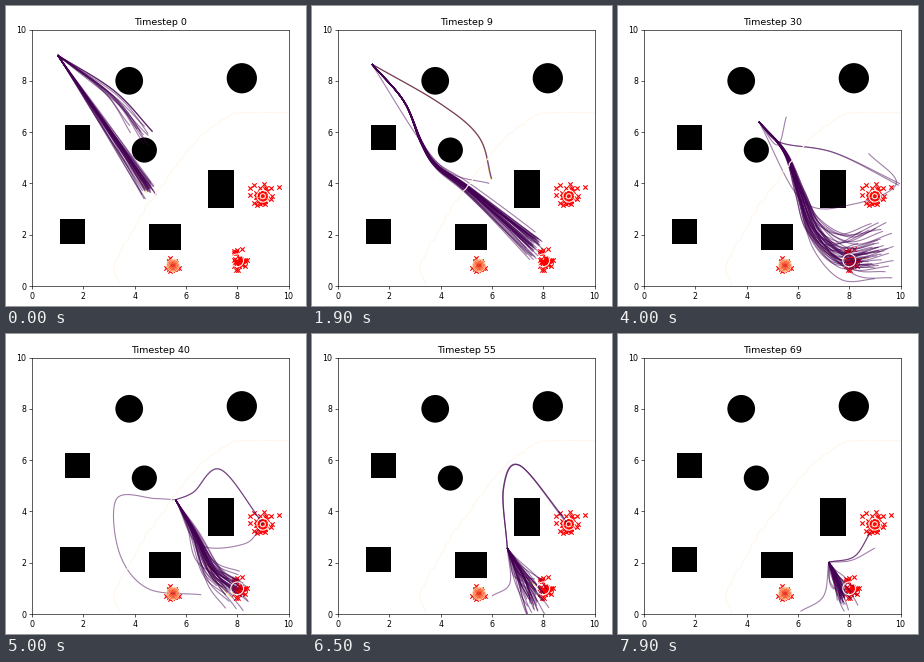
Recreate the animation shown at these times as a matplotlib script. Size 300 by 300 pixels, loop 8000 ms.

```python
import numpy as np
import matplotlib.pyplot as plt
from matplotlib.animation import FuncAnimation
from matplotlib.collections import LineCollection
from matplotlib.patches import Circle, Rectangle

SIZE, DPI = 300, 50
LEFT, RIGHT, TOP, BOTTOM = 26, 282.5, 23.5, 280
HOLD, FRAMES, INTERVAL = 10, 80, 100
SAMPLES = 60

PURPLE = (68 / 255, 1 / 255, 84 / 255, 0.5)
YELLOW = (253 / 255, 205 / 255, 37 / 255, 0.6)

NEAR, LOW, FAR = (5.5, 0.8), (8.0, 1.0), (9.0, 3.5)

rng = np.random.default_rng(12)

# Vehicle position and width of the path bundle at a few time steps
STEPS = [0, 9, 20, 30, 40, 55, 69]
HEAD = [(1, 9), (1.32, 8.65), (2.78, 7.72), (4.48, 6.4),
        (5.6, 4.45), (6.6, 2.57), (7.2, 2.02)]
SPREAD = [0.16, 0.22, 0.27, 0.45, 0.28, 0.30, 0.22]
POWER = [1.2, 2.5, 4, 1.8, 1.3, 1.1, 1.1]

# Points ahead of the vehicle, keyed by time step
MAIN = {
    0: [(4.55, 3.75)],
    9: [(2.57, 7.2), (3.25, 5.6), (3.85, 4.68), (5.1, 3.75), (7.65, 1.55)],
    20: [(3.2, 6.82), (3.37, 5.65), (3.9, 4.75), (5.1, 3.75), (7.2, 1.8), (8.5, 1.6)],
    30: [(5.5, 5.2), (6.1, 3.6), (6.7, 2.1), (7.8, 1.2), (9.1, 1.4)],
    40: [(6.3, 3.2), (7.0, 1.7), (7.9, 0.95)],
    55: [(7.65, 0.6)],
    69: [(7.8, 0.7)],
}
FAN = {**MAIN, 0: [(3.1, 7.4), (4.3, 5.9)]}
OVER = {
    0: [(3.2, 7.6), (4.7, 6.0)],
    9: [(4.0, 7.1), (5.5, 5.8), (6.0, 4.15)],
    20: [(4.8, 6.3), (5.6, 4.2), (6.05, 0.85)],
    30: [(5.3, 5.6), (7.4, 5.2), (9.9, 4.0)],
    40: [(6.3, 4.75), (7.35, 5.62), FAR],
    55: [(6.45, 4.9), (7.1, 5.8), FAR],
    69: [(8.2, 2.25), (8.8, 3.2)],
}
WIDE = {
    **OVER,
    20: [(4.9, 6.2), (5.9, 4.3), (6.3, 2.9)],
    30: [(6.2, 3.3), (8.2, 3.2), (9.85, 4.0), (8.75, 5.2)],
    40: [(6.5, 2.7), (8.3, 2.7), FAR],
    69: [(8.1, 2.1), (9.0, 2.6)],
}
BACK = {
    **MAIN,
    9: [(3.25, 5.6), (4.4, 4.4), (5.9, 4.0)],
    30: [(5.2, 5.5), (5.55, 6.6)],
    40: [(4.8, 4.5), (3.3, 4.5), (3.4, 2.4), (4.5, 1.0), (6.6, 0.75)],
    55: [(6.7, 1.2), (6.0, 0.7)],
    69: [(7.0, 0.7), (6.1, 0.1)],
}


def smooth(points):
    """Catmull-Rom curve through the points, evenly spaced along its length."""
    p = np.array(points, float)
    p = np.vstack([2 * p[0] - p[1], p, 2 * p[-1] - p[-2]])
    u = np.linspace(0, 1, 30)[:, None]
    curve = np.vstack([
        b + u * (c - a) / 2 + u**2 * (2 * a - 5 * b + 4 * c - d) / 2
        + u**3 * (3 * b - a - 3 * c + d) / 2
        for a, b, c, d in zip(p, p[1:], p[2:], p[3:])])
    length = np.append(0, np.cumsum(np.hypot(*np.diff(curve, axis=0).T)))
    at = np.linspace(0, length[-1], SAMPLES)
    return np.stack([np.interp(at, length, axis) for axis in curve.T], -1)


class Group:
    def __init__(self, route, count, looseness):
        self.curves = [smooth([h] + route[s]) for s, h in zip(STEPS, HEAD)]
        self.looseness = looseness
        self.z = np.clip(rng.normal(size=(4, count, 1, 2)), -2.2, 2.2)

    def paths(self, step):
        k = min(np.searchsorted(STEPS, step, side="right"), len(STEPS) - 1)
        mix = (step - STEPS[k - 1]) / (STEPS[k] - STEPS[k - 1])
        mean = (1 - mix) * self.curves[k - 1] + mix * self.curves[k]
        u = np.linspace(0, 1, SAMPLES)[:, None]
        width = np.interp(step, STEPS, SPREAD) * u**np.interp(step, STEPS, POWER)
        # Slow wander in time, with a turn along each path
        c, s = np.cos(0.15 * step), np.sin(0.15 * step)
        start = c * self.z[0] + s * self.z[1]
        end = c * self.z[2] + s * self.z[3]
        drift = np.cos(1.5 * u) * start + np.sin(1.5 * u) * end
        return mean + self.looseness * width * drift


groups = [Group(OVER, 2, 0.1), Group(MAIN, 36, 1), Group(FAN, 11, 1.3),
          Group(WIDE, 1, 0.1), Group(BACK, 1, 0)]

fig = plt.figure(figsize=(SIZE / DPI, SIZE / DPI), dpi=DPI, facecolor="white")
ax = fig.add_axes([LEFT / SIZE, 1 - BOTTOM / SIZE,
                   (RIGHT - LEFT) / SIZE, (BOTTOM - TOP) / SIZE])
ax.set(xlim=(0, 10), ylim=(0, 10),
       xticks=range(0, 11, 2), yticks=range(0, 11, 2))
ax.tick_params(labelsize=11.3, length=4, pad=4, width=0.9)
ax.spines[:].set_linewidth(0.9)
title = ax.set_title("Timestep 0", fontsize=13.6)

# Obstacles
for x, y, w, h in [(1.3, 5.3, 0.98, 0.98), (1.1, 1.62, 0.98, 0.98),
                   (4.55, 1.42, 1.26, 0.98), (6.88, 3.06, 0.98, 1.48)]:
    ax.add_patch(Rectangle((x, y), w, h, fc="black", lw=0, zorder=1))
for x, y, r in [(3.79, 8, 0.54), (8.18, 8.1, 0.59), (4.38, 5.3, 0.49)]:
    ax.add_patch(Circle((x, y), r, fc="black", lw=0, zorder=1))

# Goal samples
samples = np.vstack([rng.normal(goal, sigma, (count, 2)) for goal, sigma, count
                     in [(NEAR, 0.13, 30), (LOW, 0.21, 34), (FAR, 0.22, 38)]])
ax.scatter(*samples.T, s=40, marker="x", color="red", linewidths=1.6, zorder=2)

bundle = LineCollection([], linewidths=1.6, zorder=3)
ax.add_collection(bundle)

# Density contours
shade = plt.get_cmap("OrRd")
edge = smooth([(3.45, 0), (3.22, 0.75), (4, 2.3), (4.9, 3.7),
               (6.5, 5.75), (7.7, 6.6), (8.3, 6.76), (10, 6.76)])
edge[:-12] += rng.normal(0, 0.025, edge[:-12].shape)
ax.plot(*edge.T, color=shade(0.0), lw=1.6, zorder=4)

rings = [(LOW, 0.25, 0.0), (FAR, 0.23, 0.0), (FAR, 0.1, 0.1)]
rings += [(NEAR, 0.24 - 0.05 * k, 0.3 + 0.1 * k) for k in range(5)]
for center, r, level in rings:
    ax.add_patch(Circle(center, r, fill=False, ec=shade(level), lw=1.6, zorder=4))


def draw(i):
    step = max(0, i - HOLD)
    title.set_text(f"Timestep {step}")
    paths = np.concatenate([g.paths(step) for g in groups])
    colors = [PURPLE] * len(paths)
    colors[0 if 0 < step < 26 else 2] = YELLOW
    bundle.set_segments(paths)
    bundle.set_color(colors)
    return title, bundle


anim = FuncAnimation(fig, draw, frames=FRAMES, interval=INTERVAL,
                     init_func=lambda: draw(0), repeat=True, repeat_delay=0)
plt.show()
```
